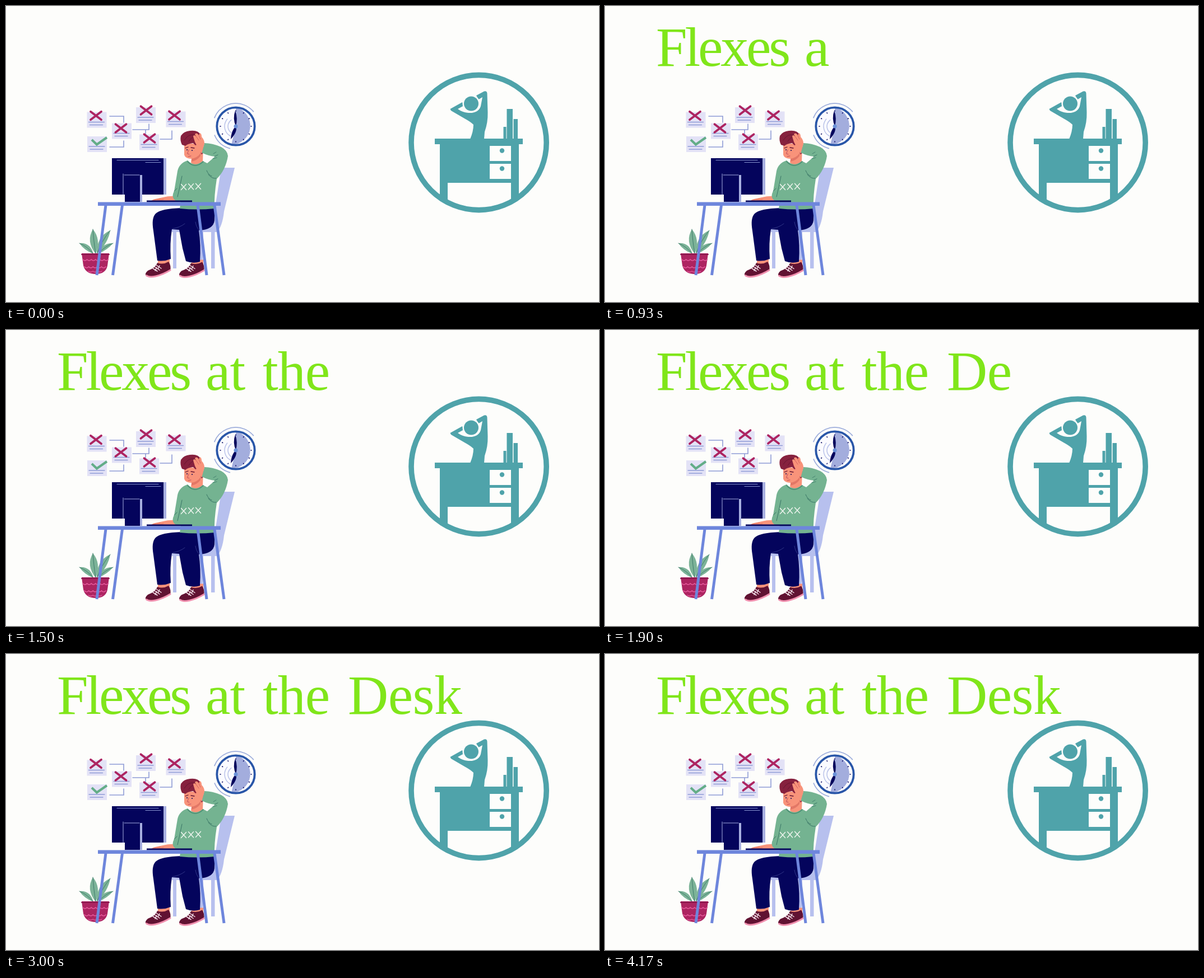
These frames come from a looping animation (1058 px wide and 529 px high, 4.21 s). An HTML page with a canvas:

```html
<!DOCTYPE html>
<html lang="en">
<head>
<meta charset="utf-8">
<title>Flexes at the Desk</title>
<style>
html, body { margin: 0; width: 100%; height: 100%; overflow: hidden; background: #fdfdfb; }
canvas { display: block; width: 100vw; height: 100vh; }
</style>
</head>
<body>
<canvas id="stage" width="1058" height="529"></canvas>
<script>
const LOOP = 4210, CHAR_MS = 115, LEAD = 40;
const BG = '#fdfdfb', NAVY = '#04045c', DESK = '#6e86dc', PALE = '#b7c0ee', LILAC = '#8f9cd6';
const TEAL = '#4fa3aa', GREEN = '#74b391', LEAF = '#7cb398', LEAF_DARK = '#397566';
const SKIN = '#f8937a', MAROON = '#611232', RED = '#ad2461', PINK = '#f08fae', HAIR = '#86213e';
const LIME = '#80e61a';

// word, left edge, tracking
const WORDS = [['Flexes', 91, -4.2], ['at', 356, -1], ['the', 458, -1], ['Desk', 610, -0.5]];

const stage = document.getElementById('stage');
const art = document.createElement('canvas');
art.width = stage.width;
art.height = stage.height;
const view = stage.getContext('2d');
const g = art.getContext('2d');

function fill(d, color) {
  g.fillStyle = color;
  g.fill(new Path2D(d));
}

function line(d, color, width = 1.5) {
  g.strokeStyle = color;
  g.lineWidth = width;
  g.stroke(new Path2D(d));
}

function box(x1, y1, x2, y2, color) {
  g.fillStyle = color;
  g.fillRect(x1, y1, x2 - x1, y2 - y1);
}

function disc(x, y, r, color) {
  g.fillStyle = color;
  g.beginPath();
  g.arc(x, y, r, 0, Math.PI * 2);
  g.fill();
}

function arc(x, y, r, from, to, color, width) {
  g.strokeStyle = color;
  g.lineWidth = width;
  g.beginPath();
  g.arc(x, y, r, from * Math.PI / 180, to * Math.PI / 180);
  g.stroke();
}

function cross(x, y, w, h, color, width) {
  line(`M${x - w} ${y - h}L${x + w} ${y + h}M${x + w} ${y - h}L${x - w} ${y + h}`, color, width);
}

function note(x, y, crossX, crossY) {
  box(x, y, x + 35, y + 28, '#e3e2f6');
  line(`M${x + 3} ${y + 18}H${x + 31}M${x + 5} ${y + 23}H${x + 28}`, LILAC, 1.3);
  if (crossX) cross(crossX, crossY, 9.5, 7.3, RED, 3.8);
}

function drawNotes() {
  line('M185 197H210V208M185 252H210V241M226 221H255V211M249 221V229M275 238H296V223', LILAC, 1.6);
  note(144.5, 189.5, 160.5, 196);
  note(189, 209.5, 205, 218.5);
  note(232, 181, 250, 186.5);
  note(285.5, 188.5, 300.5, 195.5);
  note(238, 229.5, 256, 236.5);
  note(145, 233);
  g.lineCap = 'butt';
  line('M153 239L162 247.5L180 235', '#63ad88', 4.2);
  g.lineCap = 'round';
}

function drawClock() {
  const x = 410, y = 215;
  disc(x, y, 34, '#fbfbff');
  fill('M410 215L410 181A34 34 0 0 1 402 248Z', '#a3addd');
  arc(x, y, 33.7, 0, 360, '#2956a8', 3.8);
  for (let i = 0; i < 12; i++) {
    const a = i * Math.PI / 6, c = Math.cos(a), s = Math.sin(a);
    line(`M${x + c * 27} ${y + s * 27}L${x + c * 28} ${y + s * 28}`, NAVY, 1.5);
  }
  arc(x, y, 14, 105, 235, '#b9c2e8', 1.5);
  arc(x, y, 20, 120, 220, '#b9c2e8', 1.5);
  fill('M410 215Q404 201 409 187Q414 201 410 215Z', NAVY);
  fill('M410 215Q414 224 401 238Q402 222 410 215Z', NAVY);
  disc(x, y, 3.5, '#6b91d7');
  arc(x, y, 41, 202, 320, '#9eaedc', 1.8);
  arc(x, y, 41, 105, 157, '#9eaedc', 1.8);
}

// curve bows the midrib sideways
function leaf(tipX, tipY, baseX, baseY, width, curve) {
  const dx = tipX - baseX, dy = tipY - baseY, len = Math.hypot(dx, dy);
  const ctrl = k => `${baseX + dx * 0.55 - dy / len * k} ${baseY + dy * 0.55 + dx / len * k}`;
  const base = `M${baseX} ${baseY}`, tip = `${tipX} ${tipY}`;
  fill(`${base}Q${ctrl(curve - width)} ${tip}Q${ctrl(curve + width)} ${baseX} ${baseY}Z`, LEAF);
  line(`${base}Q${ctrl(curve)} ${tip}`, LEAF_DARK, 0.9);
}

function drawPlant() {
  leaf(131, 424, 156, 443, 9, 4);
  leaf(191, 424, 164, 443, 8, -4);
  leaf(186, 401, 162, 443, 12, -4);
  leaf(155, 399, 160, 443, 14, -1);
  fill('M135 442H184L181 464Q178 479 160 479Q142 479 138 464Z', RED);
  line('M135 444H184', '#8c194f', 2);
  for (const [y, x1, n] of [[453, 137, 6], [466, 140, 5]]) {
    let d = `M${x1} ${y}`;
    for (let i = 0; i < n; i++) d += 'q3.8 4 7.6 0';
    line(d, '#e5599b', 1.6);
  }
  line('M147 474q4 3 8 0q4 3 8 0q4 3 8 0', '#e5599b', 1.4);
}

function drawChair() {
  fill('M384 289H408L389 367Q386 395 376 404H296V398H344V380H370Z', PALE);
  box(298, 400, 304, 469, PALE);
  box(366, 390, 372.5, 469, PALE);
  fill('M343 402H352L351 455H345Z', PALE);
}

function shoe(x, y) {
  g.save();
  g.translate(x, y);
  fill('M22 -3H43V6H22Z', SKIN);
  fill('M21 3Q18 12 4 17Q-3 23 2 27Q19 31 44 17Q46 8 41 1Q31 7 21 3Z', MAROON);
  line('M1.5 25.5Q6 29.5 18 27Q31 24 44 16', PINK, 3);
  line('M19 7L28 13M16 10L25 16M13 13L21 18M22 14L25 8M17 17L20 11', '#f6e4ec', 1.5);
  g.restore();
}

function drawLegs() {
  shoe(249, 456);
  shoe(309, 456.5);
  fill('M313 361Q276 362 267 371Q259 379 263 402L270 455Q282 457 294 452Q292 424 296 399L309 400Q312 417 315 433L321 456Q334 461 346 457Q348 427 344 401Q370 400 372 383V361Z', NAVY);
  line('M297 398Q310 396 319 389M344 400Q339 394 338 386', '#363c8c', 0.9);
}

function drawHead() {
  fill('M318 246L318 266Q320 273 331 273L330 280Q340 290 351 280L352 246Z', SKIN);
  fill('M331 273Q342 271 347 263L347 268Q341 276 331 278Z', '#e27766');
  fill('M314 248Q310 240 312 232Q317 224 328 223Q343 221 348 231Q354 246 351 264L348 265Q347 255 344 246L338 249L334 245Q324 246 320 250Z', HAIR);
  line('M318 240Q326 227 337 231M326 242Q333 231 341 233', '#651630', 0.9);
  line('M320 254L325 252M330 253L336 254', MAROON, 1.3);
  disc(323, 257, 1, NAVY);
  disc(332, 258, 1, NAVY);
  line('M326 257L323.5 264L327 265M325 269L330 268', '#b6485a', 0.9);
}

function drawTorso() {
  fill('M304 340Q291 339 280 342L266 345Q258 347 260 349H305Z', SKIN);
  line('M263 347L275 345M270 348L281 346', '#d76959', 0.8);
  fill('M324 276Q309 281 306 295L300 331Q294 342 303 348H312L310 362Q342 365 372 362Q371 340 376 309Q392 293 396 268Q395 258 384 252Q368 245 354 245L349 262Q361 268 373 269L359 281L351 277Q337 289 324 276Z', GREEN);
  line('M324 278Q337 292 352 278', '#498b72', 1.6);
  line('M314 304Q310 324 306 341M300 331L305 326M372 269L378 266M361 301Q367 309 375 308M358 294Q361 302 367 304', LEAF_DARK, 1);
  line('M369 273L376 271M370 264L375 261', LEAF_DARK, 0.8);
  for (const x of [317, 330, 343]) cross(x, 323.5 - (x - 317) / 20, 4.5, 5, '#edf4ed', 1.5);
}

function drawHand() {
  fill('M354 246L349 264Q341 251 337 243L334 233Q335 229 339 233L337 229Q340 225 344 231L346 227Q349 228 349 234Q354 239 354 246Z', SKIN);
  line('M339 233L344 240M344 231L347 238', '#c9535a', 0.8);
}

function drawDesk() {
  box(281, 272, 286, 337, '#a7afe0');
  box(189, 272, 281, 337, NAVY);
  line('M198 275.5H272M249 279.5H276', '#8793cf', 1.2);
  line('M209 337V300M211 302H238', '#a7afe0', 1);
  box(239, 302, 243, 350, '#a7afe0');
  box(212, 304, 239, 350, NAVY);
  box(251, 347.5, 332, 350.5, NAVY);
  g.lineCap = 'butt';
  line('M178 356L162 481M207.5 356L190.5 481M342 356L358 481M372 356L389 481', DESK, 5);
  g.lineCap = 'round';
  box(164, 350.5, 383, 357, DESK);
}

function drawBadge() {
  const x = 843.6, y = 244;
  g.save();
  g.beginPath();
  g.arc(x, y, 122, 0, Math.PI * 2);
  g.clip();
  box(774, 246, 915, 316, TEAL);
  box(774, 315, 788, 369, TEAL);
  box(901, 315, 915, 369, TEAL);
  g.restore();
  arc(x, y, 120.6, 0, 360, TEAL, 9.6);
  box(765, 237, 922, 247, TEAL);
  for (const top of [250, 282]) {
    box(863, top, 901, top + 27, BG);
    disc(885, top + 8.5, 4.2, TEAL);
  }
  box(887.5, 216, 892.5, 237, TEAL);
  box(893.5, 184, 904, 237, TEAL);
  box(905.5, 202, 913, 237, TEAL);
  fill('M792.5 184L814 172L817 178L806 184Q814 190 825 191Q843 192 847 179L850 163L843 167L839 160L853 152.5Q858 151 858.5 156L859.5 190Q860 208 854 225L853 238H828Q834 224 834 212Q829 207 818 201L794 187Z', TEAL);
  disc(830, 174.5, 15.5, BG);
  disc(830, 174.5, 13, TEAL);
}

function drawArt() {
  g.lineCap = 'round';
  box(0, 0, art.width, art.height, BG);
  drawNotes();
  drawClock();
  drawPlant();
  drawChair();
  drawLegs();
  drawHead();
  drawTorso();
  drawHand();
  drawDesk();
  drawBadge();
}

function drawTitle(count) {
  view.font = '100px "Liberation Serif", "Times New Roman", serif';
  view.fillStyle = LIME;
  for (const [word, x, tracking] of WORDS) {
    if (count <= 0) break;
    view.letterSpacing = `${tracking}px`;
    view.fillText(word.slice(0, count), x, 107);
    count -= word.length + 1;
  }
}

function frame(now) {
  const t = now % LOOP;
  view.drawImage(art, 0, 0);
  drawTitle(Math.floor((t + LEAD) / CHAR_MS));
  requestAnimationFrame(frame);
}

drawArt();
requestAnimationFrame(frame);
</script>
</body>
</html>
```
